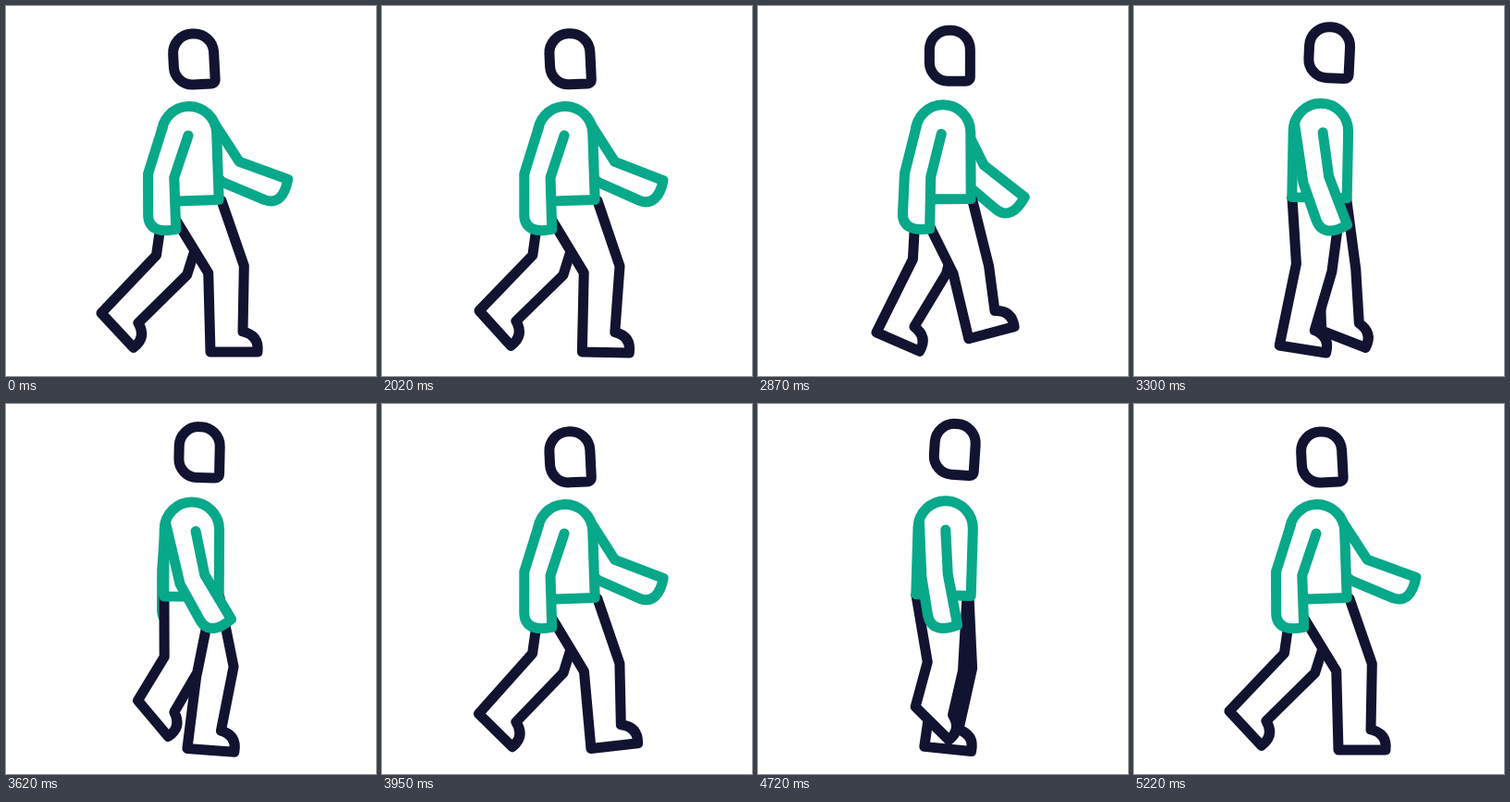
Write an HTML page that moves like this. It is 400 by 400 pixels and loops after 5250 ms.

```html
<!DOCTYPE html>
<html lang="en">
<head>
<meta charset="utf-8">
<title>Walking person</title>
<style>
  html, body { margin: 0; width: 100%; height: 100%; overflow: hidden; background: #fff; }
  svg { display: block; width: 100vw; height: 100vh; }
  path { fill: #fff; stroke-width: 11; stroke-linecap: round; stroke-linejoin: round; }
  .dark { stroke: #121331; }
  .green { stroke: #08a88a; }
</style>
</head>
<body>
<svg viewBox="0 0 400 400">
  <path id="farArm" class="green"/>
  <path id="farLeg" class="dark"/>
  <path id="nearLeg" class="dark"/>
  <path id="torso" class="green" d="M-29.7 0V-72A29.7 30 0 0 1 29.7 -72V0Z"/>
  <path id="nearArm" class="green"/>
  <path id="head" class="dark" d="M17 27H-2A20 20 0 0 1 -22 7V-7A21 21 0 0 1 -1 -28H1A21 21 0 0 1 22 -7V22Q22 27 17 27Z"/>
</svg>
<script>
const LOOP = 5250, HOLD = 2020, START = 1995, END = 5220, STRIDE = 990;
const RAD = Math.PI / 180;
const el = id => document.getElementById(id);
const wave = turns => Math.cos(2 * Math.PI * turns);
const str = (...points) => points.map(p => p.map(v => v.toFixed(2)).join(" ")).join("L");

// Key points of one step: phase, heel x, heel y, sole angle
const STEP = [
  [0, 221, 374, 0],
  [.32, 157, 367, 9],
  [.42, 115, 344, 33],
  [.5, 103, 332, 47],
  [.67, 152, 320, 50],
  [.82, 203, 351, 21],
  [.92, 234, 364, -26]
];

// Smooth periodic interpolation without overshoot.
function foot(phase) {
  const n = STEP.length, p = phase - Math.floor(phase);
  const i = STEP.findLastIndex(k => k[0] <= p);
  const key = (j, c) => STEP[(j + n) % n][c];
  const time = j => key(j, 0) + Math.floor(j / n);
  const slope = (j, c) => (key(j + 1, c) - key(j, c)) / (time(j + 1) - time(j));
  const tangent = (j, c) => {
    const a = slope(j - 1, c), b = slope(j, c);
    return a * b <= 0 ? 0 : 2 * a * b / (a + b);
  };
  const h = time(i + 1) - time(i), s = (p - time(i)) / h, r = 1 - s;
  return [1, 2, 3].map(c => key(i, c) * r * r * (1 + 2 * s) + key(i + 1, c) * s * s * (3 - 2 * s)
    + h * s * r * (tangent(i, c) * r - tangent(i + 1, c) * s));
}

// Offset from p in the frame of a limb: 0 degrees hangs down, positive swings forward.
function offset([x, y], angle, across, along) {
  const s = Math.sin(angle * RAD), c = Math.cos(angle * RAD);
  return [x + across * c + along * s, y - across * s + along * c];
}

function drawLeg(id, phase, hipY) {
  const c = wave(phase), thigh = 4.5 + 22 * c;
  const [x, y, sole] = foot(phase), heel = [x, y];
  const knee = offset([201, hipY], thigh, 0, 78 + 5 * c);
  const shin = Math.atan2(x - knee[0], y - knee[1]) / RAD;
  const bend = .6 * thigh + .4 * shin;
  const onFoot = (across, along) => offset(heel, -sole, across, along);
  el(id).setAttribute("d",
    `M${str([171, hipY], offset(knee, bend, -19.7, 0), heel, onFoot(51, 0))}` +
    `Q${str(onFoot(53, -18))} ${str(onFoot(35, -22), offset(knee, bend, 19.7, 0), [227 + 6 * c, hipY])}`);
}

// upper and fore hold the middle angle and the swing of each half.
function drawArm(id, phase, shoulder, pit, upper, fore) {
  const c = wave(phase);
  const a = upper[0] - upper[1] * c;
  const b = fore[0] - fore[1] * c + 11 * wave(2 * phase);
  const inner = offset(pit, a, 0, 48), outer = offset(inner, (a + b) / 2, -28.5, 0);
  const tip = offset(inner, b, 0, 56);
  const hand = (across, along) => str(offset(tip, b, across, along));
  el(id).setAttribute("d", `M${str(shoulder, outer)}L${hand(-29.5, -16)}` +
    `C${hand(-29.5, -1)} ${hand(-17, 3)} ${str(tip, inner, pit)}`);
}

function place(id, x, y, turn) {
  el(id).setAttribute("transform", `translate(${x} ${y}) rotate(${turn})`);
}

// Steady steps, then the last half stride slows down to rest.
function strides(t) {
  if (t < HOLD || t >= END) return 0;
  const u = (t - START) / STRIDE, rest = (END - START) / STRIDE - 2.5;
  if (u < 2.5) return u;
  const s = (u - 2.5) / rest, v = rest / .5;
  return 2.5 + .5 * s * (v - (v - 1) * s);
}

function draw() {
  const phase = strides(performance.now() % LOOP), swing = wave(phase);
  const bob = wave(2 * phase), hipY = 208.5 + 2 * bob, lean = -.1 - 1.9 * bob;
  const shoulder = offset([200.5, hipY], -lean, -28.5, -80);

  drawArm("farArm", phase + .5, shoulder, [213 + 13 * swing, 132 - 4 * swing], [7, 26], [25, 34]);
  drawLeg("farLeg", phase + .5, hipY);
  drawLeg("nearLeg", phase, hipY);
  place("torso", 200.5, hipY, lean);
  drawArm("nearArm", phase, shoulder, [202 - 5 * swing, 138 + 2 * bob], [0, 18.5], [17, 26]);
  place("head", 208 - 5 * bob, 53.6 + 4.4 * bob, .5 - 3.5 * bob);
  requestAnimationFrame(draw);
}
draw();
</script>
</body>
</html>
```
